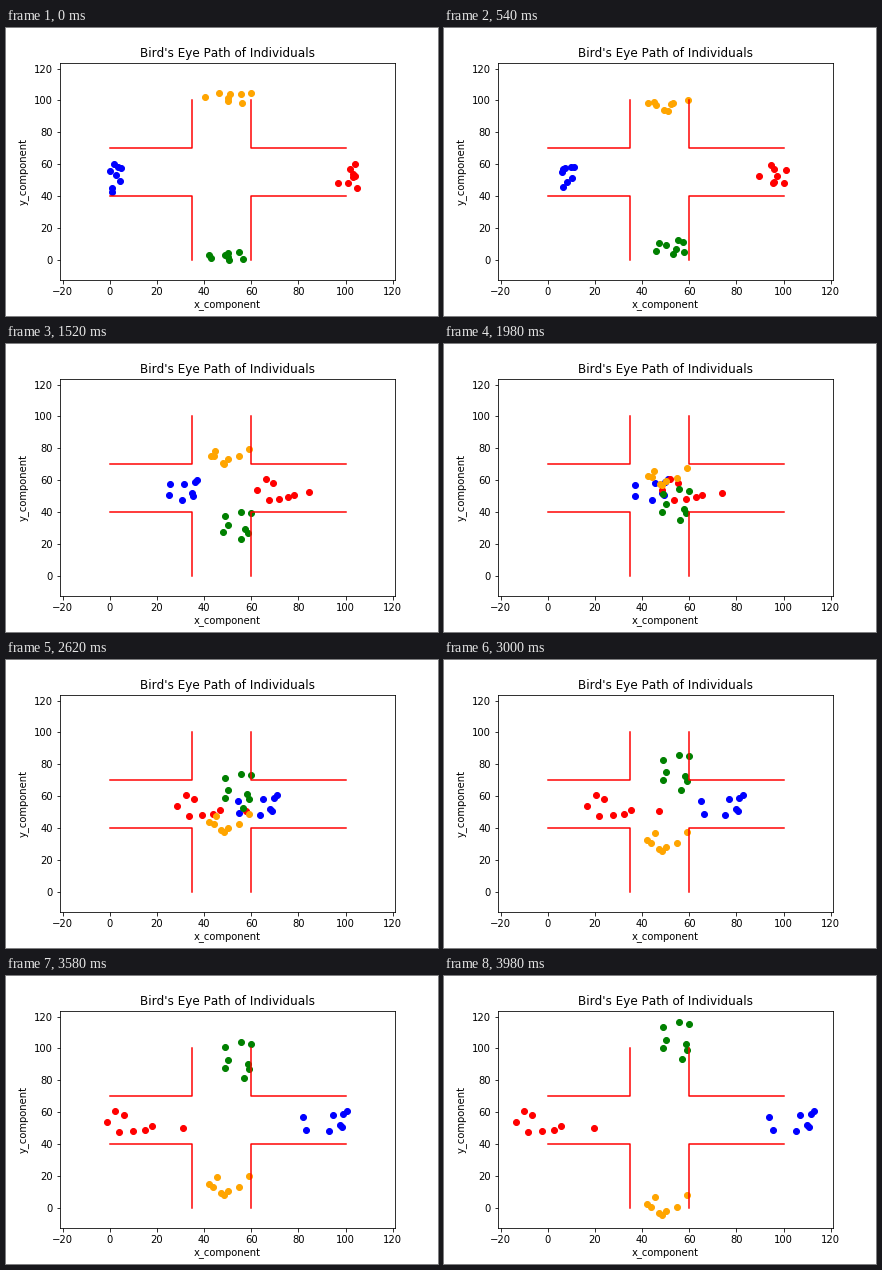
A matplotlib script for the animation above (4 s loop, 432 by 288 pixels).

```python
import numpy as np
import matplotlib.pyplot as plt
from matplotlib.animation import FuncAnimation

FRAMES, STEP = 200, 20
END = (FRAMES - 1) * STEP / 1000
CRUISE = 31  # walking speed, units per second

plt.rcParams["text.kerning_factor"] = 6


class Crowd:
    """Walkers that speed up to CRUISE while drifting into their lane.

    The shorter a walker's trip, the longer it took to get going.
    """

    def __init__(self, ax, color, axis, start, finish):
        self.axis = axis
        self.start = np.array(start, float)
        self.trip = np.array(finish) - self.start
        self.lag = END - np.abs(self.trip[:, axis]) / CRUISE
        self.dots = ax.scatter(*self.start.T, color=color)

    def travelled(self, t):
        return t - self.lag * (1 - np.exp(-t / self.lag))

    def move(self, t):
        share = np.empty_like(self.trip)
        share[:, 1 - self.axis] = 1 - np.exp(-t / self.lag)
        share[:, self.axis] = self.travelled(t) / self.travelled(END)
        self.dots.set_offsets(self.start + self.trip * share)


fig, ax = plt.subplots(figsize=(6, 4), dpi=72)
fig.subplots_adjust(left=.125, right=.9, bottom=.125, top=.88)
ax.set(xlim=(-21.063, 120.898), ylim=(-12.68, 123.78),
       xticks=range(-20, 121, 20), yticks=range(0, 121, 20),
       xlabel="x_component", ylabel="y_component",
       title="Bird's Eye Path of Individuals")

for side, x in ((0, 35), (100, 60)):
    for end, y in ((0, 40), (100, 70)):
        ax.plot([side, x, x], [y, y, end], color="red", lw=1.5)

crowds = [
    Crowd(ax, "blue", 0,
          [(2, 60), (3.7, 58.5), (.3, 55.5), (5, 57.5),
           (2.5, 53), (1, 45), (4.3, 49.5), (1, 42.5)],
          [(95.5, 48.5), (94, 57), (107, 58), (111.5, 59),
           (113, 60.5), (111, 50.5), (110, 52), (105.5, 48)]),
    Crowd(ax, "red", 0,
          [(104, 60), (104.7, 45), (102, 57), (103, 54),
           (103, 52), (97, 48), (104, 52.5), (101, 48)],
          [(19.5, 49.5), (5.5, 51.5), (2.5, 48.5), (-6.5, 58.5),
           (-10, 61), (-13.5, 54), (-8.5, 47.5), (-2.5, 48)]),
    Crowd(ax, "green", 1,
          [(50.5, 0), (43, 1), (56.5, .5), (50, 1.5),
           (50, 4.5), (49, 3), (55, 5), (42, 3)],
          [(57, 93.3), (49, 100.3), (59, 99.3), (58.5, 102.8),
           (50, 105.3), (60, 115.3), (55.5, 116.3), (49, 113.3)]),
    Crowd(ax, "orange", 1,
          [(60, 104.8), (51, 104), (55.5, 103.8), (50, 99.8),
           (56, 98.3), (40.5, 102.3), (50, 101.8), (46.5, 104.8)],
          [(59, 8), (55, .5), (50, -2), (48.5, -4.5),
           (47, -3), (45.5, 7), (42, 2.5), (44, .5)]),
]


def update(i):
    for crowd in crowds:
        crowd.move(i * STEP / 1000)
    return [crowd.dots for crowd in crowds]


anim = FuncAnimation(fig, update, frames=FRAMES, interval=STEP,
                     repeat=True, repeat_delay=0)
plt.show()
```
